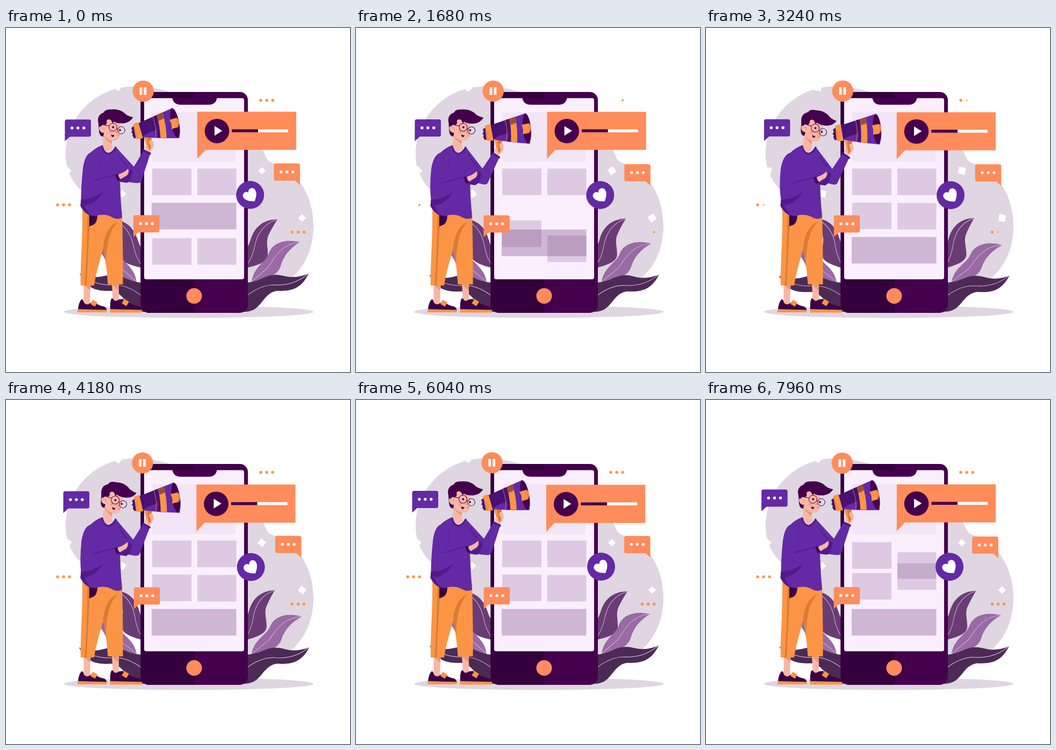
Animation, 640 px wide and 640 px high, one loop 8 s. Source, as an HTML page with a canvas:

```html
<!DOCTYPE html>
<html lang="en">
<head>
<meta charset="utf-8">
<title>Phone announcement</title>
<style>
html, body { margin: 0; width: 100%; height: 100%; overflow: hidden; background: #fff; }
canvas { display: block; width: 640px; height: 640px; }
</style>
</head>
<body>
<canvas id="stage" width="640" height="640"></canvas>
<script>
const canvas = document.getElementById('stage');
const c = canvas.getContext('2d');
const ratio = window.devicePixelRatio || 1;
canvas.width = canvas.height = 640 * ratio;

const LOOP = 8000, STEP = 112;
const PLUM = '#44004d', NIGHT = '#34003e', VIOLET = '#6429a5', SHADE = '#511a89', CORAL = '#ff8c5a',
  ORANGE = '#fb9545', RUST = '#d97c33', SKIN = '#f8b7a6', MIST = '#dfd6e2';

// Shared key times for the slow drifts
const TIMES = [0, 1680, 3240, 4920, 6040, 7020, 7960];

function drift(t, v) {
  let i = 0;
  while (i < TIMES.length - 2 && t >= TIMES[i + 1]) i++;
  const slope = k => {
    const a = Math.max(0, k - 1), b = Math.min(TIMES.length - 1, k + 1);
    return (v[b] - v[a]) / (TIMES[b] - TIMES[a]);
  };
  const h = TIMES[i + 1] - TIMES[i], u = Math.min(1, (t - TIMES[i]) / h);
  const u2 = u * u, u3 = u2 * u;
  return (2 * u3 - 3 * u2 + 1) * v[i] + (u3 - 2 * u2 + u) * h * slope(i)
    + (3 * u2 - 2 * u3) * v[i + 1] + (u3 - u2) * h * slope(i + 1);
}

function ease(t, start, end) {
  const u = Math.max(0, Math.min(1, (t - start) / (end - start)));
  return u * u * (3 - 2 * u);
}

const mix = (a, b, u) => a + (b - a) * u;

function fill(d, color) {
  c.fillStyle = color;
  c.fill(new Path2D(d));
}

function line(d, color, width) {
  c.strokeStyle = color;
  c.lineWidth = width;
  c.stroke(new Path2D(d));
}

function disc(x, y, r, color) {
  if (r <= 0) return;
  c.fillStyle = color;
  c.beginPath();
  c.arc(x, y, r, 0, Math.PI * 2);
  c.fill();
}

function box(x, y, w, h, color, r = 0) {
  c.fillStyle = color;
  c.beginPath();
  c.roundRect(x, y, w, h, r);
  c.fill();
}

function at(x, y, draw) {
  c.save();
  c.translate(x, y);
  draw();
  c.restore();
}

function turn(x, y, deg, draw) {
  c.save();
  c.translate(x, y);
  c.rotate(deg * Math.PI / 180);
  c.translate(-x, -y);
  draw();
  c.restore();
}

function backdrop(t) {
  fill('M111 235C111 165 168 108 240 108.5C330 110 380 160 440 190Q472 207 482 236Q486 248 495 251C540 262 572 310 572 368C572 410 556 444 530 466Q480 500 410 455C340 410 290 385 235 372C200 360 172 335 146 308C122 288 111 262 111 235Z', MIST);
  const size = 9.9 * drift(t, [1, 1.23, 1.3, 1, 1, 1, 1]);
  const angle = -45 + 90 * ease(t, 800, 5000);
  [[476, 265.5], [551, 353.5], [216.5, 308.5], [115, 265.5], [208.5, 110.5]].forEach(([x, y]) =>
    turn(x, y, angle, () => box(x - size / 2, y - size / 2, size, size, '#fff')));

  const off = [[500, 1000], [1000, 1500], [1500, 2050]];
  const on = [[2150, 2900], [2980, 3520], [3500, 4100]];
  [[96, 329], [474, 134.5], [532.3, 379.8]].forEach(([x, y]) => {
    for (let i = 0; i < 3; i++) {
      const s = 1 - ease(t, ...off[i]) + ease(t, ...on[i]);
      disc(x + i * 11.1, y, 2.7 * s, ORANGE);
    }
  });
  c.fillStyle = MIST;
  c.beginPath();
  c.ellipse(340, 528, 232, 11.5, 0, 0, Math.PI * 2);
  c.fill();
}

function leaves(sway) {
  const vein = '#cfa9da';
  turn(450, 470, -3 * sway, () => {
    fill('M505 356C478 356 462 371 455 394Q450 410 440 420V448C462 443 486 438 487 423C488 408 482 396 490 382Q496 370 505 356Z', '#6a3c74');
    line('M503 357C474 366 465 392 462 409Q458 428 446 444', vein, 1.1);
  });
  turn(455, 470, 3.5 * sway, () => {
    fill('M547 398C520 392 496 399 489 419C484 436 460 444 457 473C480 470 506 461 511 443C516 424 528 410 547 398Z', '#996aa3');
    line('M545 398C508 404 499 430 487 446Q472 459 458 471', vein, 1.1);
  });
  turn(450, 500, 2 * sway, () => {
    fill('M563 457C544 464 532 465 516 461C482 453 478 474 440 474V528C478 530 474 494 504 489C530 490 549 486 563 457Z', '#4c2a55');
    line('M561 458C540 476 518 479 499 478Q472 478 446 500', vein, 1.1);
  });
}

function card(x, y, w, alpha = .2, h = 49.5) {
  box(x, y, w, h, `rgba(105,50,118,${alpha})`);
}

function phone(t) {
  box(250.5, 119, 199.5, 411, PLUM, 15);
  c.save();
  c.beginPath();
  c.roundRect(250.5, 119, 199.5, 411, 15);
  c.clip();
  box(250, 119, 100.5, 411, NIGHT);
  c.restore();
  box(257, 130.5, 186, 337, '#faf0fd', 4);
  fill('M309.500 130H392.500C391.500 138 386 142.800 377 142.800H325C316 142.800 310.500 138 309.500 130Z', PLUM);
  disc(350, 498.5, 14.5, CORAL);

  const swapLeft = ease(t, 6396, 8196), swapRight = ease(t, 6730, 8730);
  card(272, 157, 155, .055, 92);
  card(272, 261.5 + 63.5 * swapLeft, 73, .2);
  card(356, 261.5 + 63.5 * swapRight, 72.5, .2);
  card(271, 325.2 + 63.6 * ease(t, 420, 2220), 157.5, .3);
  card(272, 391 - 66.2 * ease(t, 780, 2580) - 63.5 * swapLeft, 73, .2);
  card(356, 391 - 65.5 * ease(t, 1374, 3174) - 63.5 * swapRight, 72.5, .2);
}

function bubble(x, y, color, right) {
  at(x, y, () => {
    box(0, 0, 48.5, 32, color, 3.5);
    fill(right ? 'M48.500 28V40L38 31Z' : 'M0 28V40.500L10.500 31Z', color);
    for (let i = 0; i < 3; i++) disc(13.3 + i * 11, 15.7, 2.7, '#fff');
  });
}

function badges(t) {
  at(drift(t, [255.3, 255.3, 254.4, 253.6, 253, 253, 253.3]), drift(t, [117.5, 117.4, 117.2, 117, 116.8, 117.2, 117.5]), () => {
    disc(0, 0, 19.7, CORAL);
    box(-6.8, -7, 4.8, 14, '#fff');
    box(1.2, -7, 4.8, 14, '#fff');
  });

  at(drift(t, [0, -.3, -1, -1.8, -1.8, -1.4, -.9]), drift(t, [0, .1, .9, 1.9, 2, 1.7, 1.1]), () => {
    fill('M355.800 155.800H540V226.700H371L355.800 243Z', CORAL);
    disc(392.5, 191.7, 22.8, PLUM);
    fill('M388 182.300L402.300 191.200L388 200.200Z', '#fff');
    box(420.3, 188.4, 49, 5.5, PLUM);
    box(469, 188.4, 56, 5.5, '#fff');
  });

  at(drift(t, [454.2, 454.3, 455, 456, 456, 454.9, 453]), drift(t, [310.6, 310.7, 311, 310.5, 310, 310.1, 310.2]), () => {
    disc(0, 0, 26, VIOLET);
    turn(0, 0, -35, () =>
      fill('M0 14.500C-8 9 -13 4 -13 -3C-13 -9.500 -4 -13 0 -5.500C4 -13 13 -9.500 13 -3C13 4 8 9 0 14.500Z', '#fff'));
  });

  bubble(drift(t, [109.5, 109.4, 108, 105.4, 104.5, 103.6, 103.2]), drift(t, [170.2, 170, 169.8, 169.5, 169.1, 167.7, 166.6]), VIOLET);
  bubble(drift(t, [498.4, 499.3, 500.7, 500.6, 499, 497, 495.2]), drift(t, [252, 253.2, 253.4, 252.4, 252.9, 253.4, 254]), CORAL, true);
}

function legs() {
  fill('M144.500 474H157.500L156 512Q150 517 144.500 511Z', SKIN);
  fill('M144.500 478H157.500L157 488Z', '#e59a80');
  fill('M197 474H210L210 506Q203 511 198.500 504Z', SKIN);
  fill('M197 477H210L209.500 489Z', '#e59a80');

  fill('M134 524Q135 510 141 504.500Q144 505 145 511Q150 517 156 512L163 508Q170 516 182 518Q187 520 187.500 525Z', '#3c0045');
  fill('M133.500 523L187.500 524.500V529H133Z', ORANGE);
  turn(163.5, 512, 32, () => box(158.5, 507.5, 10, 9, ORANGE));

  fill('M194 524Q193 510 196 503.500L199 503Q202 511 210 505L217 504Q230 514 244 517Q252 518 253 525Z', '#3c0045');
  fill('M193.500 523L253 524.500V529.500H193Z', ORANGE);
  turn(222, 511, 32, () => box(217, 506, 10, 9.5, ORANGE));

  fill('M142 334C143 390 138 440 139 479H164C168 452 176 430 181 409Q187 440 189.500 477H217.500C218 430 217 390 216 340Z', ORANGE);
  fill('M152 340L157 345C154 390 152 435 150 479H146.500C150 430 151 390 152 340Z', RUST);
  fill('M209 360C190 368 182 388 181 409Q185 424 186 442C187 408 190 377 209 360Z', RUST);
  fill('M155 345L170 347Q170 362 163 366L155 369Z', '#3c0045');
}

function head(tilt) {
  turn(190, 215, 8 * tilt, () => {
    fill('M181 190L180 222Q188 236 198 226L196 206Z', SKIN);
    fill('M182 199Q189 209 197 209V215Q186 211 182 199Z', '#e59a80');
    fill('M172 178H185L181 202Q174 202 173 192Z', PLUM);
    fill('M183 166H211Q213 180 212 197Q210 210 201 209.500Q188 209 183 194Z', SKIN);
    fill('M186 182Q180 178 174.500 182Q171 188 176 193Q181 197 186 193Z', SKIN);
    line('M177 186Q182 184 183 190', '#e08a75', 1);
    disc(193.5, 193.5, 2.8, '#f59b8b');
    disc(208.5, 199.5, 2.6, '#f59b8b');
    fill('M172 178Q168 162 182 157Q184 151 196 151.500Q209 150 219 157Q225 164 236.500 166Q231 176 218 177.500Q207 178 200 174L199 178L195 171Q189 168 187 173Q189 178 184 181Q178 179 176 184Q173 183 172 178Z', PLUM);
    c.lineWidth = 1;
    c.strokeStyle = PLUM;
    for (const [x, y, r] of [[199, 184.6, 7.5], [214.5, 190.2, 6.8]]) {
      c.beginPath();
      c.arc(x, y, r, 0, Math.PI * 2);
      c.stroke();
    }
    line('M206 187.500L208 188M192 182L184 181', PLUM, 1);
    disc(199.3, 184.6, 2, PLUM);
    disc(212, 189.8, 1.9, PLUM);
    line('M205 190L207 195L203 194', '#e08a75', 1.1);
    fill('M195.500 198Q199 200 201.500 199Q201.500 202.500 198 203Q195.500 202 195.500 198Z', PLUM);
  });
}

function shirt(lean, arm) {
  const m = (a, b) => mix(a, b, arm), l = -4 * lean;
  fill(`M204 221L${m(238, 235)} ${m(258, 262)}L${m(257, 255)} ${m(226, 232)}L${m(269, 267)} ${m(232, 240)}L${m(252, 245)} ${m(284, 287)}Q${m(250, 243)} ${m(289, 292)} ${m(243, 238)} ${m(288.5, 291.5)}L${m(212, 210)} 285Z`, VIOLET);
  line(`M${m(256, 254.5)} ${m(228, 233.5)}L${m(268, 266)} ${m(233.5, 241.5)}`, SHADE, 4);
  fill(`M179 218Q166 223 157 232Q${146.500 + l * .8} 236 ${143 + l} 262Q${139.500 + l} 296 139.500 320L138.500 331Q148 349 166 350Q184 344 199 353Q208 357 216 353Q213 320 212 285L${m(217, 216)} 245L204 221Q198 231 190 233Q182 232 179 218Z`, VIOLET);
  line('M179 220Q182 233 191 234Q199 232 204 222', SHADE, 3);
  fill('M139.500 319Q160 320 180 305Q168 327 146 330Q150 341 158 349Q146 346 138.500 331Z', SHADE);
  fill(`M171 236Q${176 + l * .4} 254 ${168 + l} 279Q${177 + l * .5} 254 171 236Z`, SHADE);
  fill('M208 234Q220 251 229 260Q219 256 208 234Z', SHADE);
  at(-3 * arm, 5 * arm, () => {
    line('M164 284Q184 278 209 272', SHADE, 1.6);
    fill('M205 273Q218 271 227 262Q230 268 225 274Q218 278 210 283Z', SKIN);
    fill('M203 273L209 271.500Q209 278 214 282L208 285Q204 279 203 273Z', '#3f0a62');
    fill('M214 282Q228 278 232 262L236 267L231 283L225 288L211 286Z', SHADE);
  });
}

function megaphone(arm) {
  at(0, 6 * arm, () => turn(266, 215, 6 * arm, () => {
    fill('M257 203L271 202L270 229L264 230Z', RUST);
    fill('M257 203L262 203L267 230L264 230Z', ORANGE);
    fill('M233 186L238 182L244 205L238 205L235 200L236 197L233 194L235 191Z', '#471177');
    fill('M236.500 178.500L247 175L255 205L242 206.500Z', ORANGE);
    line('M240 188L245 205', RUST, 1);
    fill('M247 177L309 149Q323 170 323 204.500Q288 206 254.500 203Z', VIOLET);
    fill('M247 177L276 164Q283 185 279 190Q266 193 254 202Z', '#491173');
    fill('M274 164.500L280 162Q287 184 287 204H281Q284 184 274 164.500Z', '#491173');
    fill('M281 161.500L291 157Q298 179 299 204.500H287.500Q286 182 281 161.500Z', ORANGE);
    fill('M281 161.500L291 157L294 168L284 173Z', '#9b4f38');
    line('M273 165Q281 187 278 204', RUST, .9);
    turn(314, 177, -11, () => {
      c.beginPath();
      c.ellipse(314, 177, 8.2, 28.6, 0, 0, Math.PI * 2);
      c.fillStyle = VIOLET;
      c.fill();
      c.beginPath();
      c.ellipse(314.3, 177, 7.3, 27.5, 0, 0, Math.PI * 2);
      c.fillStyle = PLUM;
      c.fill();
    });
    fill('M304 171L317 167Q321 168 322 176Q322 183 319 185L308 188Q309 178 304 171Z', ORANGE);
    line('M317 168Q321 176 319 184', RUST, 1.2);
    fill('M259 226Q257 220 262 217L266 228L271 222L266 213Q266 208 272 209Q276 214 274 222L268 231Z', SKIN);
    line('M267 214L273 213M268 219L274 218', '#e59a80', .8);
  }));
}

function render(t) {
  c.setTransform(ratio, 0, 0, ratio, 0, 0);
  c.fillStyle = '#fff';
  c.fillRect(0, 0, 640, 640);
  c.lineCap = 'round';
  c.lineJoin = 'round';

  const sway = drift(t, [0, .5, 1, .55, 0, 0, .4]);
  const lean = drift(t, [0, .75, 1, .25, 0, 0, 0]);
  const tilt = drift(t, [0, .1, 1, .8, 0, 0, 0]);
  const arm = ease(t, 0, 2100) - ease(t, 3300, 4850);

  backdrop(t);
  leaves(sway);
  c.save();
  c.translate(700, 0);
  c.scale(-1, 1);
  leaves(sway);
  c.restore();
  phone(t);
  badges(t);
  legs();
  head(tilt);
  shirt(lean, arm);
  megaphone(arm);
  bubble(drift(t, [237, 237.4, 237.8, 237.8, 237.7, 237.7, 237.7]), drift(t, [348.2, 348.5, 348.5, 348.4, 348.2, 348.1, 348.1]), CORAL);
}

function frame() {
  const t = performance.now() % LOOP;
  render(Math.floor((t + 14) / STEP) * STEP);
  requestAnimationFrame(frame);
}
frame();
</script>
</body>
</html>
```
